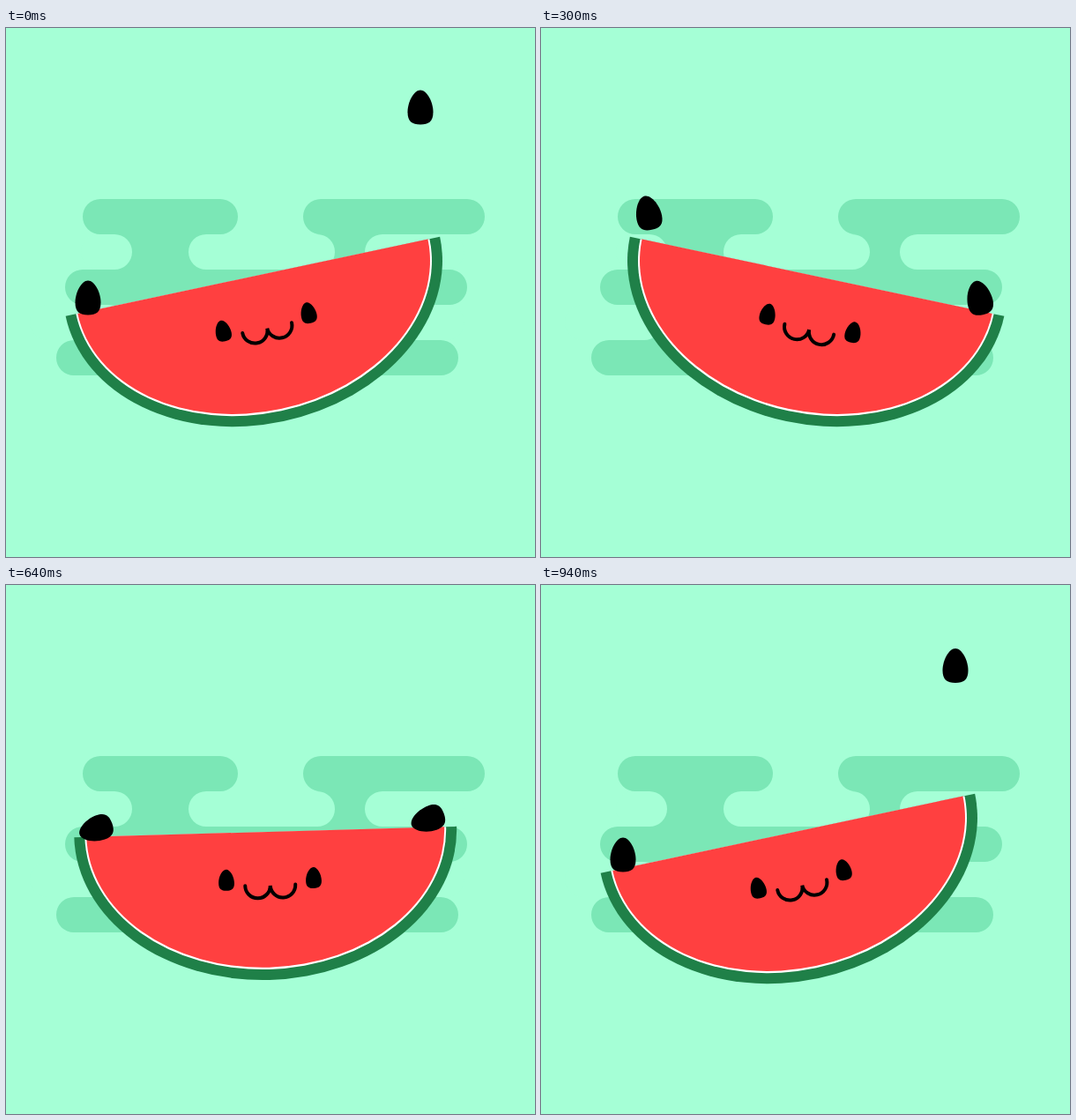
Write an HTML page that moves like this. It is 600 by 600 pixels and loops after 960 ms.

```html
<!DOCTYPE html>
<html lang="en">
<head>
<meta charset="utf-8">
<title>Watermelon seesaw</title>
<style>
  html, body { margin: 0; height: 100%; overflow: hidden; background: #a5ffd6; }
  svg { display: block; width: 600px; height: 600px; }
  .bar { fill: none; stroke-width: 40; stroke-linecap: round; }
</style>
</head>
<body>
<svg viewBox="0 0 600 600">
  <defs>
    <path id="seed" d="M0-19.5C7.5-19.5 14.5-6 14.5 5.5C14.5 16 9.5 19.5 0 19.5C-9.5 19.5-14.5 16-14.5 5.5C-14.5-6-7.5-19.5 0-19.5Z"/>
  </defs>

  <g id="cloud">
    <path class="bar" stroke="#7be7b6" d="M107 214H243M357 214H523M87 294H503M77 374H493"/>
    <path fill="#7be7b6" d="M123 234H427V274H123ZM117 314H430V354H117Z"/>
    <path class="bar" stroke="#a5ffd6" d="M105 254H123M227 254H353M427 254H500M430 334H500M47 334H117"/>
  </g>

  <!-- The slice is drawn around its pivot -->
  <g id="melon">
    <path fill="#1f8048" d="M-217-80A217 168 0 0 0 217-80Z"/>
    <path fill="#fff" d="M-205-80A205 156 0 0 0 205-80Z"/>
    <path fill="#ff4040" d="M-203-80A203 153.7 0 0 0 203-80Z"/>
    <use href="#seed" transform="translate(-45.8 -26.5) scale(.615)"/>
    <use href="#seed" transform="translate(53.2 -26.5) scale(.615)"/>
    <path fill="none" stroke="#000" stroke-width="4" stroke-linecap="round"
      d="M-24.7-19.5A14.2 14.2 0 0 0 3.8-19A14.2 14.2 0 0 0 32.3-19.5"/>
  </g>

  <use id="left" href="#seed"/>
  <use id="right" href="#seed"/>
</svg>
<script>
const STEP = 20, STEPS = 48, TILT = 12, JUMP = 136, SWING = 80;
const [melon, left, right] = ['melon', 'left', 'right'].map(id => document.getElementById(id));

const clamp = x => Math.min(1, Math.max(0, x));
const smooth = x => (x = clamp(x), x * x * (3 - 2 * x));

// Cubic bezier (1/6, 1/6, 2/3, 1): steady start, soft stop
function easeOut(x) {
  x = clamp(x);
  const curve = (u, a, b) => 3 * a * u * (1 - u) ** 2 + 3 * b * u * u * (1 - u) + u ** 3;
  let lo = 0, hi = 1;
  for (let i = 0; i < 24; i++) {
    const mid = (lo + hi) / 2;
    if (curve(mid, 1 / 6, 2 / 3) < x) lo = mid; else hi = mid;
  }
  return curve(lo, 1 / 6, 1);
}

const hop = (k, start, peak, end) =>
  JUMP * easeOut(k < peak ? (k - start) / (peak - start) : (end - k) / (end - peak));

function draw(k) {
  const swing = smooth((k - 9.7) / 4.5) - smooth((k - 29.6) / 4.4);
  const spin = 360 * (smooth((k - 9.65) / 6) - smooth((k - 29.8) / 6));
  const wrapped = k < 20 ? k + STEPS : k;
  const placeSeed = (seed, x, y) =>
    seed.setAttribute('transform', `translate(${x} ${y}) rotate(${spin} 0 4)`);

  melon.setAttribute('transform', `translate(296.5 360) rotate(${TILT * (2 * swing - 1)})`);
  placeSeed(left, 93 + 29.5 * swing, 306 - SWING * swing - hop(k, 14, 24, 30));
  placeSeed(right, 470 + 28 * swing, 226 + SWING * swing - hop(wrapped, 34, 48, 58));
}

const begin = performance.now();
function tick() {
  draw(Math.floor((performance.now() - begin) / STEP) % STEPS);
  requestAnimationFrame(tick);
}
tick();
</script>
</body>
</html>
```
